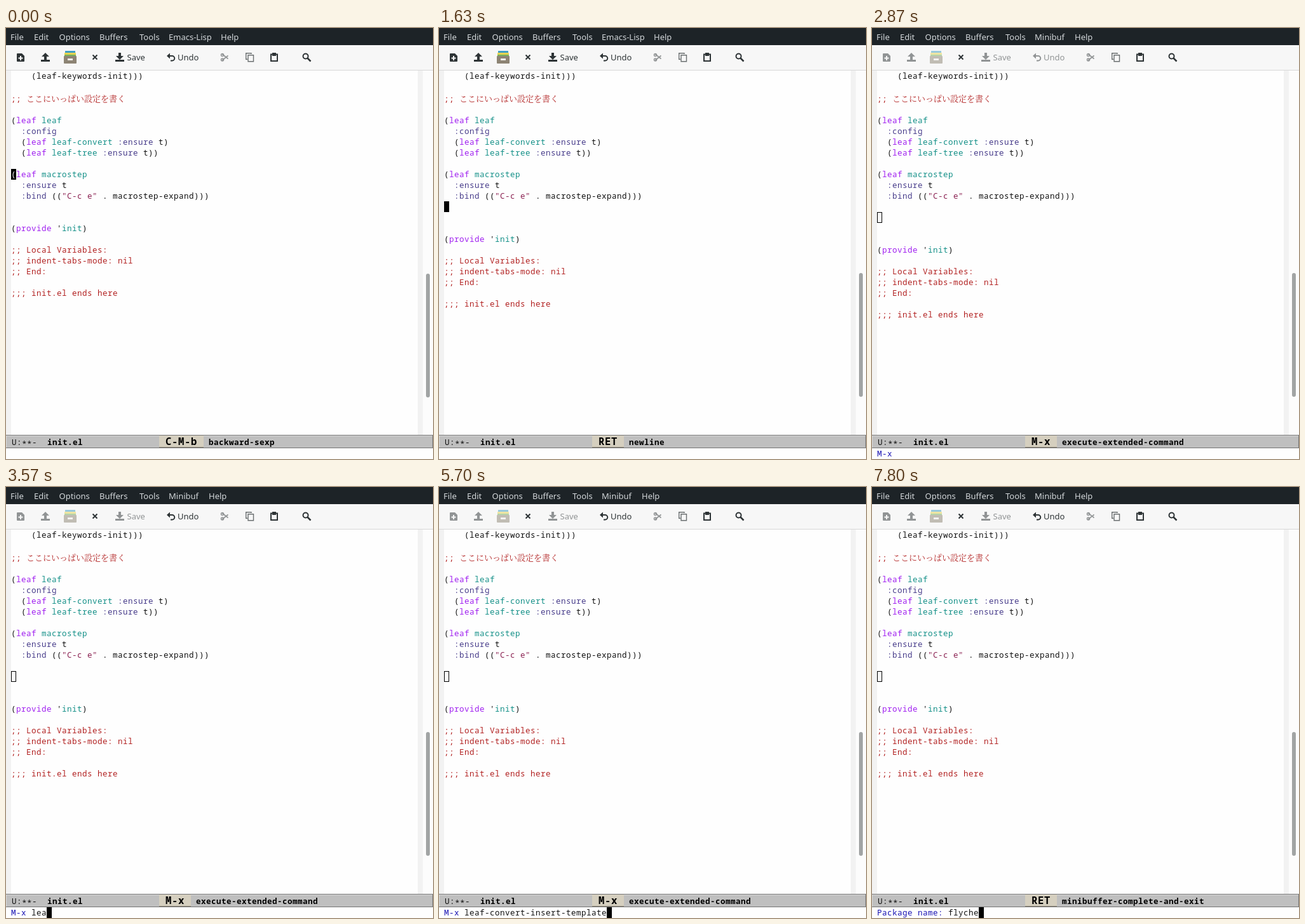
Recreate the animation shown at these times as an HTML page. Size 672 by 679 pixels, loop 8 s.

```html
<!DOCTYPE html>
<html lang="en">
<head>
<meta charset="utf-8">
<title>Editor session</title>
<style>
  html, body { margin: 0; width: 100%; height: 100%; overflow: hidden; background: #fefefe; }
  svg { display: block; }
  text { font: 12.5px "Noto Sans Mono", monospace; letter-spacing: .04em; white-space: pre; fill: #111; }
  .ui, .ui text { font: 13px "Noto Sans", sans-serif; letter-spacing: 0; }
  .menu text { fill: #d3d7da; }
  .bold { font-weight: bold; fill: #000; }
  .key { font-size: 15.625px; }
  .keyword { fill: #a020f0; }
  .name { fill: #149088; }
  .builtin { fill: #483d8b; }
  .string { fill: #8b2252; }
  .comment { fill: #b22222; }
  .prompt { fill: #1a14b4; }
  .ja { font: 13px "Noto Serif CJK JP", "Noto Sans CJK JP", "Noto Sans CJK", serif; letter-spacing: 0; }
  .tool { fill: #2e3436; stroke: none; }
  .tool text { fill: #2e3436; }
  .line { fill: none; stroke: #2e3436; stroke-width: 2; }
  .off { opacity: .5; }
</style>
</head>
<body>
<svg width="672" height="679" viewBox="0 0 672 679">
  <rect width="672" height="679" fill="#fefefe"/>
  <path d="M0 67h8v575h-8zM648 67h8v575h-8z" fill="#f2f2f2"/>
  <rect x="656" y="67" width="16" height="575" fill="#fcfcfc"/>
  <rect id="thumb" x="661" width="6" height="195" rx="3" fill="#a1a4a4"/>

  <rect width="672" height="27" fill="#1d2327"/>
  <g class="ui menu">
    <text x="7" y="19">File</text>
    <text x="44" y="19">Edit</text>
    <text x="83.5" y="19">Options</text>
    <text x="147" y="19">Buffers</text>
    <text x="210" y="19">Tools</text>
    <text id="mode" x="256" y="19"></text>
    <text id="help" y="19">Help</text>
  </g>

  <rect y="27" width="672" height="40" fill="#f7f7f7"/>
  <rect y="66" width="672" height="1" fill="#d8d8d8"/>
  <g class="ui tool">
    <g id="files">
      <path d="M18 40h7l4 4v8q0 1-1 1h-10q-1 0-1-1v-11q0-1 1-1z"/>
      <path d="M23 44v7M19.500 47.500h7" stroke="#f7f7f7" stroke-width="2"/>
      <path d="M62 39l6 6h-4v5h-4v-5h-4zM55 50h14v3h-14z"/>
      <path d="M93 36h16v3h-16z" fill="#3f9fc4"/>
      <path d="M92 39h18v3h-18z" fill="#e8d44f"/>
      <path d="M92 42h18v3h-18z" fill="#79b25c"/>
      <rect x="91" y="44" width="20" height="12" rx="1" fill="#8d8474"/>
      <rect x="97" y="48" width="8" height="3" fill="#f3f1ec"/>
    </g>
    <path class="line" d="M136.500 42.500l7 7m0-7l-7 7"/>
    <g id="save">
      <path d="M177 39h4v5h4l-6 6-6-6h4zM172 50h14v3h-14z"/>
      <text x="190.500" y="51">Save</text>
    </g>
    <g id="undo">
      <path class="line" d="M255 44h6.500a3.700 3.700 0 0 1 0 7.500h-2.500"/>
      <path d="M253 44l5-4.500v9z"/>
      <text x="270" y="51">Undo</text>
    </g>
    <g class="off">
      <path class="line" d="M339 41l9.500 7.500M339 51l9.500-7.500" transform="translate(1)" style="stroke-width:1.600"/>
      <circle cx="340.500" cy="42.500" r="2" class="line" style="stroke-width:1.500"/>
      <circle cx="340.500" cy="50" r="2" class="line" style="stroke-width:1.500"/>
    </g>
    <path class="line" d="M386 41v-1.300h-8.300v9.600h2.300M381 42.700h8.500v10h-8.500z" style="stroke-width:1.400;opacity:.7"/>
    <path class="line" d="M417 41.500h10v10.500h-10z"/>
    <path d="M419 39h6v5h-6z"/>
    <circle class="line" cx="471.500" cy="44.500" r="4"/>
    <path class="line" d="M474.500 47.500l5 5" style="stroke-width:2.500"/>
  </g>

  <g id="head"></g>
  <g id="tail"></g>
  <rect id="hollow" x="8.500" y="290.500" width="7" height="16" fill="none" stroke="#000"/>

  <rect y="641" width="672" height="21" fill="#747474"/>
  <rect y="642" width="671" height="19" fill="#d8d8d8"/>
  <rect x="1" y="643" width="670" height="18" fill="#bfbfbf"/>
  <text x="9" y="657">U:<tspan dy="2.500">**</tspan><tspan dy="-2.500">-</tspan></text>
  <text class="bold" x="65" y="657">init.el</text>
  <rect id="keyEdge" x="241" y="642" height="19" fill="#857e70"/>
  <rect id="keyBox" x="241" y="642" height="18" fill="#d5cfbf"/>
  <text id="key" class="bold key" x="251" y="657"></text>
  <text id="command" class="bold" y="657"></text>

  <text id="mini" x="8" y="675"></text>
  <rect id="cursor" width="8" height="17"/>
  <text id="under" x="8" y="235" style="fill:#fff">(</text>
</svg>
<script>
const LOOP = 8000, CHAR = 8, ROW = 17;
const $ = id => document.getElementById(id);
const span = (cls, s) => s ? `<tspan class="${cls}">${s}</tspan>` : '';

function highlight(line) {
  if (line.startsWith(';')) {
    return span('comment', line.replace(/[\u3040-\u9fff]+/, s => span('ja', s)));
  }
  return line.replace(/\((leaf|provide) ('?)([\w-]+)|(:\w+)|("[^"]*")/g,
    (_, word, quote, name, builtin, string) => word
      ? '(' + span('keyword', word) + ' ' + quote + span('name', name)
      : span('builtin', builtin) + span('string', string));
}

function lay(id, top, source) {
  $(id).innerHTML = source.split('\n').map((line, i) =>
    `<text x="8" y="${top + i * ROW}">${highlight(line)}</text>`).join('');
}

lay('head', 82, `

;; ここにいっぱい設定を書く

(leaf leaf
  :config
  (leaf leaf-convert :ensure t)
  (leaf leaf-tree :ensure t))

(leaf macrostep
  :ensure t
  :bind (("C-c e" . macrostep-expand)))`);
$('head').firstChild.textContent = '    (leaf-keywords-init)))';
$('head').firstChild.setAttribute('y', 80);

lay('tail', 320, `(provide 'init)

;; Local Variables:
;; indent-tabs-mode: nil
;; End:

;;; init.el ends here`);

// Each step changes part of the editor state at a given time.
const steps = [];
const at = (time, change) => steps.push([time, { on: true, ...change }]);
const blink = (time, on = false) => at(time, { on });
const type = (time, gap, before, letters) => [...letters].forEach((_, i) =>
  at(time + i * gap, { input: before + letters.slice(0, i + 1), undo: true }));

at(0, { key: 'C-M-b', command: 'backward-sexp', newlines: 0, x: 8, y: 222, prompt: '', input: '', undo: true, mini: false });
blink(170);
blink(670, true);
at(1030, { key: 'C-M-f', command: 'forward-sexp', x: 320, y: 256 });
blink(1530);
at(1630, { key: 'RET', command: 'newline', newlines: 1, x: 8, y: 273 });
at(1730, { newlines: 2, y: 290 });
blink(2230);
at(2370, { key: 'M-x', command: 'execute-extended-command', mini: true, prompt: 'M-x ', undo: false });
blink(2870);
blink(3370, true);
type(3430, 67, '', 'leaf-');
type(4000, 66, 'leaf-', 'conv');
blink(4700);
at(4730, { input: 'leaf-convert-' });
blink(5230);
type(5430, 70, 'leaf-convert-', 'in');
at(5700, { input: 'leaf-convert-insert-template' });
blink(6200);
at(6470, { key: 'RET', command: 'minibuffer-complete-and-exit', prompt: '', input: '', on: false });
at(6570, { prompt: 'Package name: ', undo: false });
blink(7070);
type(7370, 86, '', 'flyche');

function render(time) {
  const s = {};
  for (const [start, change] of steps) if (start <= time) Object.assign(s, change);
  const set = (id, name, value) => $(id).setAttribute(name, value);
  const show = (id, visible) => set(id, 'visibility', visible ? 'visible' : 'hidden');

  $('mode').textContent = s.mini ? 'Minibuf' : 'Emacs-Lisp';
  set('help', 'x', s.mini ? 319 : 338);
  set('files', 'class', s.mini ? 'off' : '');
  set('save', 'class', s.mini ? 'off' : '');
  set('undo', 'class', s.undo ? '' : 'off');
  set('tail', 'transform', `translate(0 ${s.newlines * ROW})`);
  set('thumb', 'y', s.newlines ? 386 : 387);

  const keyWidth = s.key.length * 10 + 20;
  set('keyBox', 'width', keyWidth);
  set('keyEdge', 'width', keyWidth);
  $('key').textContent = s.key;
  $('command').textContent = s.command;
  set('command', 'x', 241 + keyWidth + CHAR);

  $('mini').innerHTML = span('prompt', s.prompt) + s.input;
  set('cursor', 'x', s.mini ? 8 + (s.prompt + s.input).length * CHAR : s.x);
  set('cursor', 'y', s.mini ? 662 : s.y);
  show('cursor', s.on);
  show('hollow', s.mini);
  show('under', s.on && !s.mini && s.y === 222);
}

function tick() {
  render(performance.now() % LOOP);
  requestAnimationFrame(tick);
}
tick();
</script>
</body>
</html>
```
